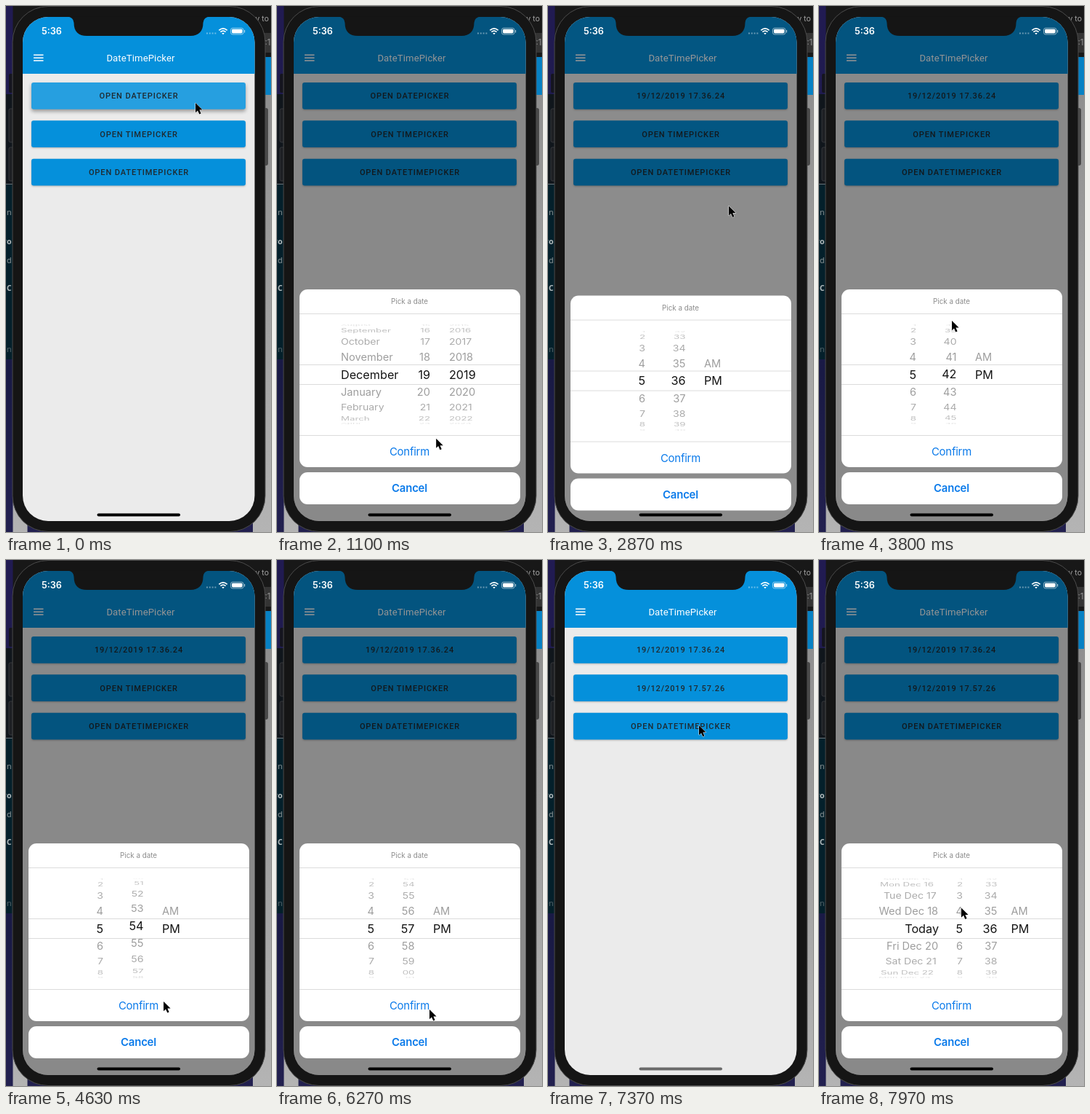
Recreate the animation shown at these times as an HTML page. Size 365 px wide and 722 px high, loop 8000 ms.

```html
<!DOCTYPE html>
<html lang="en">
<head>
<meta charset="utf-8">
<title>DateTimePicker</title>
<style>
  html, body { margin: 0; width: 100%; height: 100%; overflow: hidden; background: #1b1a45; }
  svg { display: block; width: 100vw; height: 100vh; }
  text { white-space: pre; }
  .ui { font-family: Inter, sans-serif; }
  .app { font-family: Roboto, sans-serif; }
  .mono { font: 11px "Noto Sans Mono", monospace; fill: #8d9698; text-anchor: end; }
  .label { font-size: 11px; font-weight: 500; letter-spacing: .9px; text-anchor: middle; fill: #1f2a30; }
  .mid { text-anchor: middle; }
  .action { font-size: 14.9px; letter-spacing: -.2px; fill: #0a7aea; text-anchor: middle; }
</style>
</head>
<body>
<svg viewBox="0 0 365 722" preserveAspectRatio="none">
  <defs>
    <linearGradient id="navy" x2="0" y2="1">
      <stop offset="0" stop-color="#211b52"/><stop offset=".7" stop-color="#191a45"/><stop offset="1" stop-color="#22204f"/>
    </linearGradient>
    <linearGradient id="window" x2="0" y2="1">
      <stop offset="0" stop-color="#8f8f8f"/><stop offset="1" stop-color="#b4b4b4"/>
    </linearGradient>
    <clipPath id="screen"><rect x="23" y="15" width="319.5" height="692" rx="35"/></clipPath>
    <clipPath id="band"><rect x="31" y="493" width="304" height="26"/></clipPath>
  </defs>

  <!-- desktop behind the phone -->
  <rect width="365" height="722" fill="url(#navy)"/>
  <rect x="4" y="93" width="8" height="26" rx="2" fill="#15151f"/>
  <rect y="121" width="12" height="364" fill="#04202b"/>
  <rect y="121" width="12" height="123" fill="#10161c"/>
  <path d="M12 141H6q-2 0-2 2v42q0 2 2 2h6M12 194H6q-2 0-2 2v42q0 2 2 2h6" fill="#1d1f23" stroke="#34373b"/>
  <path d="M0 244.5h12" stroke="#6b7378"/>
  <g class="mono">
    <text x="7.5" y="287">n</text>
    <text x="7.5" y="327" font-weight="700" fill="#b4bcbe">vo</text>
    <text x="7.5" y="353">d</text>
    <text x="7.5" y="391" font-weight="700" fill="#b4bcbe">-C</text>
    <text x="7.5" y="475" fill="#56666c">en</text>
  </g>
  <rect x="9.500" y="485" width="20" height="237" fill="url(#window)"/>
  <rect x="9.500" width="356" height="71" fill="#181818"/>
  <rect x="340" y="37" width="30" height="27" fill="#343434"/>
  <rect x="340" y="70" width="25" height="52" fill="#0781c4"/>
  <rect x="340" y="122" width="25" height="600" fill="url(#window)"/>
  <rect x="340" y="140" width="21" height="79" rx="3" fill="#494949"/>
  <text class="ui" x="343.500" y="20.500" font-size="10.500" fill="#a5a5a5">y to</text>
  <text class="ui" x="356.500" y="54" font-size="11.500" fill="#969696">:1</text>

  <!-- phone -->
  <rect x="9" y=".5" width="348" height="721" rx="49" fill="#151515" stroke="#4b4b4b"/>
  <g clip-path="url(#screen)">
    <rect x="23" y="15" width="320" height="692" fill="#ebebeb"/>
    <rect x="23" y="15" width="320" height="78" fill="#0590db"/>
    <path d="M38 67.300h13.500M38 71.200h13.500M38 75.100h13.500" stroke="#fff" stroke-width="1.500"/>
    <text class="app mid" x="185.500" y="75.500" font-size="13.100" letter-spacing=".12" fill="#fff">DateTimePicker</text>
    <g id="buttons" class="app"></g>
    <rect id="dim" x="23" y="15" width="320" height="692"/>
    <g id="sheet" class="ui">
      <rect x="31" y="389" width="304" height="244" rx="11" fill="#fff"/>
      <text class="mid" x="182.500" y="409" font-size="9.800" fill="#8c8c8c">Pick a date</text>
      <g id="rows"></g>
      <rect x="31" y="493" width="304" height="26" fill="#fff"/>
      <g id="chosen" clip-path="url(#band)"></g>
      <path d="M31 422.500h304M31 492.500h304M31 519.500h304M31 589.500h304" stroke="#dcdcdc"/>
      <text class="action" x="182.500" y="617">Confirm</text>
      <rect x="31" y="640" width="304" height="44" rx="11" fill="#fff"/>
      <text class="action" x="182.500" y="667" font-weight="600">Cancel</text>
    </g>
    <rect id="home" x="125.500" y="696.500" width="114.500" height="4" rx="2"/>
  </g>
  <path d="M84 14.500q9 .5 9.500 8.500c0 12 6 18 18 18h142c12 0 18-6 18-18q.5-8 9.500-8.500z" fill="#151515"/>
  <text class="ui" x="49" y="39" font-size="12.600" font-weight="600" fill="#fff">5:36</text>
  <path d="M276 37.500h14" stroke="#fff" stroke-opacity=".4" stroke-width="2" stroke-dasharray="2 1.800"/>
  <g fill="none" stroke="#fff" stroke-width="1.700">
    <path d="M293.300 33.300q5.700-4.800 11.400 0M295.400 35.700q3.600-3 7.200 0"/>
    <path d="M297.200 37.300q1.800-1.300 3.600 0l-1.800 1.900z" fill="#fff" stroke="none"/>
    <rect x="309.500" y="30.300" width="17.500" height="8.700" rx="2.600" stroke-width="1" stroke-opacity=".55"/>
    <rect x="311" y="31.800" width="14.500" height="5.700" rx="1.400" fill="#fff" stroke="none"/>
    <path d="M328.600 33v3.400" stroke-width="1.200" stroke-opacity=".6"/>
  </g>
  <path id="cursor" d="M0 0v13.200l3-2.800 2.300 5.100 2.300-1-2.200-5h4.200z" stroke="#fff" stroke-width="1" paint-order="stroke" stroke-linejoin="round"/>
</svg>
<script>
const LOOP = 8000, SLIDE = 300, TRAVEL = 333, CENTER = 506, RADIUS = 68, STEP = 20.7 * Math.PI / 180;
const $ = id => document.getElementById(id);
const clamp = v => Math.min(1, Math.max(0, v));
const easeInOut = p => p < .5 ? 2 * p * p : 1 - 2 * (1 - p) ** 2;
const mod = (n, m) => ((n % m) + m) % m;

function add(parent, tag, attrs, text = '') {
  const el = document.createElementNS('http://www.w3.org/2000/svg', tag);
  for (const key in attrs) el.setAttribute(key, attrs[key]);
  el.textContent = text;
  return parent.appendChild(el);
}

// Smooth curve through [time, value] points without overshoot.
function track(points) {
  const slope = i => points[i + 1] && points[i]
    ? (points[i + 1][1] - points[i][1]) / (points[i + 1][0] - points[i][0]) : 0;
  const tangent = i => {
    const a = slope(i - 1), b = slope(i);
    return a * b > 0 ? 2 * a * b / (a + b) : 0;
  };
  return t => {
    const i = points.findLastIndex(p => p[0] <= t);
    if (i === points.length - 1) return points[i][1];
    const [t0, v0] = points[i], [t1, v1] = points[i + 1], d = t1 - t0, p = (t - t0) / d, q = 1 - p;
    return v0 * (1 + 2 * p) * q * q + tangent(i) * d * p * q * q
      + v1 * p * p * (3 - 2 * p) - tangent(i + 1) * d * p * p * q;
  };
}

const path = [
  [0, 261, 133], [230, 261, 134], [850, 221, 590], [1200, 219, 594], [1950, 219, 594],
  [2400, 254, 178], [2640, 254, 181], [2870, 249, 274], [3300, 181, 560], [3380, 181, 560],
  [3800, 183, 432], [4080, 190, 450], [4630, 217, 606], [5000, 212, 616], [6270, 210, 617],
  [6620, 210, 617], [7200, 208, 227], [7580, 208, 227], [7960, 196, 477], [8000, 196, 478]
];
const cursorX = track(path.map(p => [p[0], p[1]]));
const cursorY = track(path.map(p => [p[0], p[2]]));

// Finger drag, then a flick that slows down to rest.
const drag = track([[0, 36], [3360, 36], [3600, 38.5], [3800, 42]]);
const minute = t => t < 3800 ? drag(t) : 57 - 15 * (1 - clamp((t - 3800) / 1469)) ** 2;

const buttons = [
  { y: 105, text: 'OPEN DATEPICKER', done: '19/12/2019 17.36.24', doneAt: 1400, press: [-100, 120] },
  { y: 157.3, text: 'OPEN TIMEPICKER', done: '19/12/2019 17.57.26', doneAt: 6480, press: [2480, 2580] },
  { y: 209.7, text: 'OPEN DATETIMEPICKER', done: '', doneAt: Infinity, press: [7430, 7530] }
];
for (const b of buttons) {
  b.box = add($('buttons'), 'rect', { x: 35, y: b.y, width: 295, height: 36.8, rx: 3 });
  b.label = add($('buttons'), 'text', { x: 183, y: b.y + 22.3, class: 'label' });
}

const months = 'January February March April May June July August September October November December'.split(' ');
const dayLabel = n => n === 0 ? 'Today'
  : new Date(Date.UTC(2019, 11, 19 + n)).toUTCString().replace(/^(\w+), (\d+) (\w+).*/, '$1 $3 $2');
const wheel = (x, anchor, label, pos, pivot = x) => ({ x, anchor, label, pos, pivot });
const month = wheel(88, 'start', n => months[mod(n, 12)], () => 11);
const day = wheel(211, 'end', n => mod(n - 1, 31) + 1, () => 19);
const year = wheel(237, 'start', String, () => 2019);
const hour = x => wheel(x, 'end', n => mod(n - 1, 12) + 1, () => 5);
const minutes = (x, pos) => wheel(x, 'end', n => String(mod(n, 60)).padStart(2, '0'), pos);
const half = x => wheel(x, 'start', n => ['AM', 'PM'][n] || '', () => 1);

const pickers = [
  { open: 180, close: 1380, wheels: [month, day, year] },
  { open: 2605, close: 6450, wheels: [hour(134), minutes(189.5, minute), half(215)] },
  { open: 7550, close: Infinity,
    wheels: [wheel(165, 'end', dayLabel, () => 0, 95), hour(198), minutes(245.5, () => 36), half(264.5)] }
];
for (const p of pickers) {
  p.groups = ['rows', 'chosen'].map(id => add($(id), 'g', {}));
  for (const w of p.wheels) {
    const makeRows = (group, size) => Array.from({ length: 9 }, () =>
      add(group, 'text', { 'text-anchor': w.anchor, 'font-size': size }));
    w.layers = [makeRows(p.groups[0], 14.8), makeRows(p.groups[1], 16.2)];
  }
}

function drawWheel(w, t) {
  const pos = w.pos(t), base = Math.round(pos);
  w.layers.forEach((rows, chosen) => rows.forEach((row, i) => {
    const n = base + i - 4, angle = (n - pos) * STEP, flat = Math.cos(angle);
    const visible = flat > .06 && !(chosen && Math.abs(n - pos) > 1);
    row.setAttribute('opacity', visible ? (chosen ? .92 : .4 * flat ** .6) : 0);
    if (!visible) return;
    row.textContent = w.label(n);
    row.setAttribute('y', chosen ? 5.9 : 5.4);
    const k = 1 - .19 * (1 - flat);
    const x = w.pivot + (w.x - w.pivot) * k, y = CENTER + RADIUS * Math.sin(angle);
    row.setAttribute('transform', `translate(${x} ${y}) scale(${k} ${flat})`);
  }));
}

function drawButton(b, t) {
  const lift = t < b.press[0] ? 0
    : Math.min(clamp((t - b.press[0]) / 60), 1 - clamp((t - b.press[1]) / 150));
  b.label.textContent = t < b.doneAt ? b.text : b.done;
  b.box.style.fill = `color-mix(in srgb, #269fe0 ${lift * 100}%, #0590db)`;
  b.box.style.filter = `drop-shadow(0 ${1 + 2 * lift}px ${1 + 1.5 * lift}px rgba(0,0,0,${.25 + .1 * lift}))`;
}

function draw(t) {
  buttons.forEach(b => drawButton(b, t));
  let shown = 0, fade = 0;
  for (const p of pickers) {
    const progress = easeInOut(clamp((t - p.open) / SLIDE)) - easeInOut(clamp((t - p.close) / SLIDE));
    for (const g of p.groups) g.style.display = progress > 0 ? '' : 'none';
    if (progress > 0) p.wheels.forEach(w => drawWheel(w, t));
    shown = Math.max(shown, progress);
    if (t > p.close) fade = clamp((t - p.close - SLIDE) / 150);
    else if (t > p.open) fade = 1 - clamp((t - p.open) / 150);
  }
  if (t < pickers[0].close) fade = 0;
  $('dim').setAttribute('opacity', .42 * shown);
  $('sheet').setAttribute('transform', `translate(0 ${TRAVEL * (1 - shown)})`);
  $('home').setAttribute('opacity', 1 - .45 * fade);
  $('cursor').setAttribute('transform', `translate(${cursorX(t)} ${cursorY(t)})`);
}

function tick() {
  draw(performance.now() % LOOP);
  requestAnimationFrame(tick);
}
tick();
</script>
</body>
</html>
```
